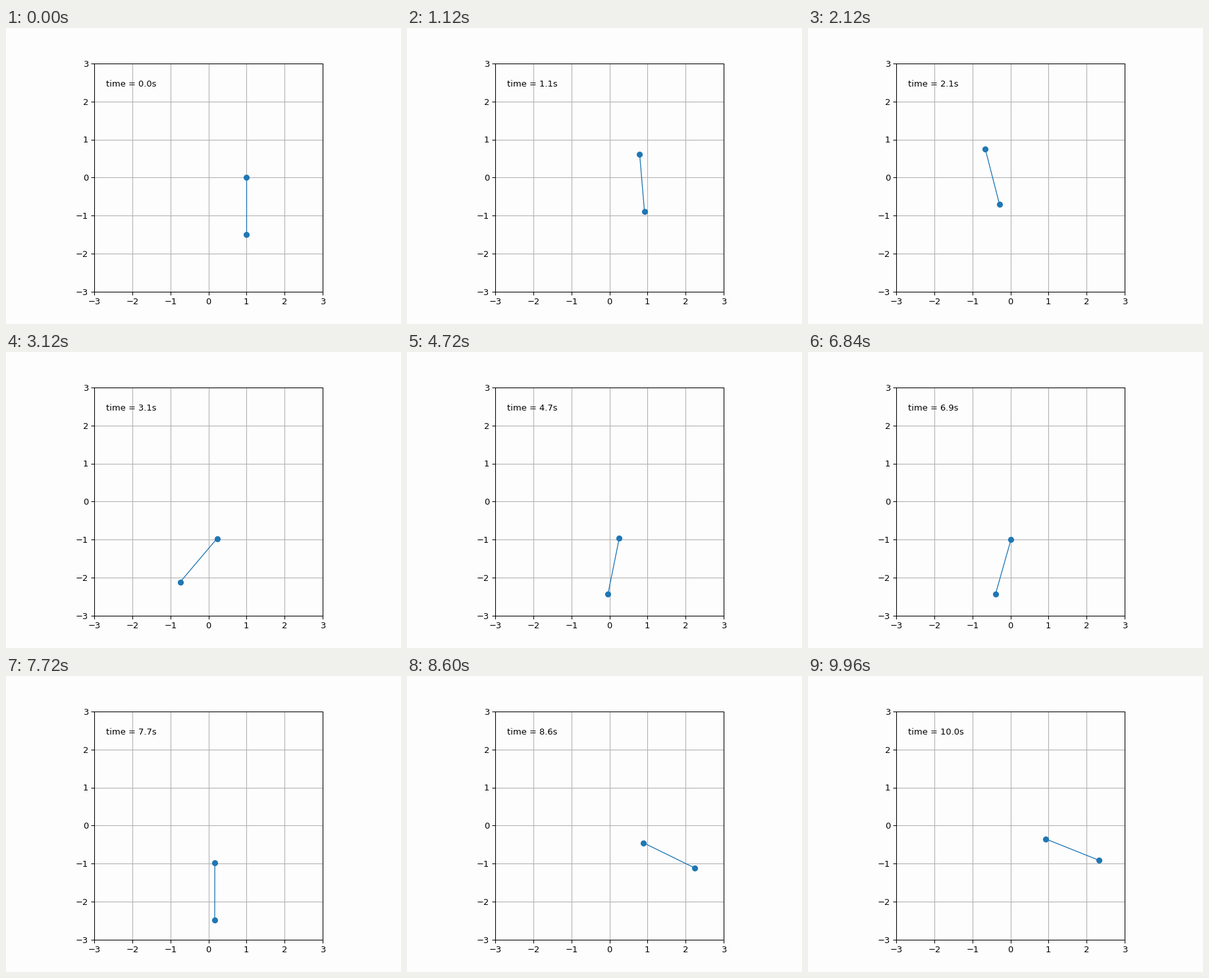
Animation of 600x450 px, one loop 10000 ms. Source, as a matplotlib script:

```python
import numpy as np
import matplotlib.pyplot as plt
from matplotlib.animation import FuncAnimation

G = 9.81        # gravity
LENGTH = 1.5    # rod length
DAMPING = 1.0
BACKGROUND = "#fefdfe"


def pivot(t):
    """Pivot on the unit circle with constant angular acceleration."""
    return np.cos(t**2 / 2), np.sin(t**2 / 2)


def derivative(t, state):
    angle, speed = state
    px, py = pivot(t)
    ax = -py - t**2 * px
    ay = px - t**2 * py
    pull = (G + ay) * np.sin(angle) + ax * np.cos(angle)
    return np.array([speed, -pull / LENGTH - DAMPING * speed])


def solve(times):
    """Runge-Kutta integration of the rod angle, starting at rest."""
    state = np.zeros(2)
    angles = [0.0]
    for t, t_next in zip(times[:-1], times[1:]):
        h = t_next - t
        k1 = derivative(t, state)
        k2 = derivative(t + h / 2, state + h / 2 * k1)
        k3 = derivative(t + h / 2, state + h / 2 * k2)
        k4 = derivative(t + h, state + h * k3)
        state = state + h / 6 * (k1 + 2 * k2 + 2 * k3 + k4)
        angles.append(state[0])
    return np.array(angles)


samples = np.linspace(0, 10, 1000)
angles = solve(samples)[2::4]
times = samples[2::4]
pivot_x, pivot_y = pivot(times)
bob_x = pivot_x + LENGTH * np.sin(angles)
bob_y = pivot_y - LENGTH * np.cos(angles)

fig, ax = plt.subplots(figsize=(6.4, 4.8), dpi=93.75, facecolor=BACKGROUND)
ax.set_facecolor(BACKGROUND)
ax.set_aspect("equal")
ax.set_xlim(-3, 3)
ax.set_ylim(-3, 3)
ax.set_xticks(range(-3, 4))
ax.set_yticks(range(-3, 4))
ax.grid()

rod, = ax.plot([], [], "o-", lw=1)
clock = ax.text(0.05, 0.9, "", transform=ax.transAxes)


def update(i):
    rod.set_data([pivot_x[i], bob_x[i]], [pivot_y[i], bob_y[i]])
    clock.set_text(f"time = {times[i]:.1f}s")
    return rod, clock


ani = FuncAnimation(fig, update, frames=len(times), interval=40, repeat=True)
plt.show()
```
